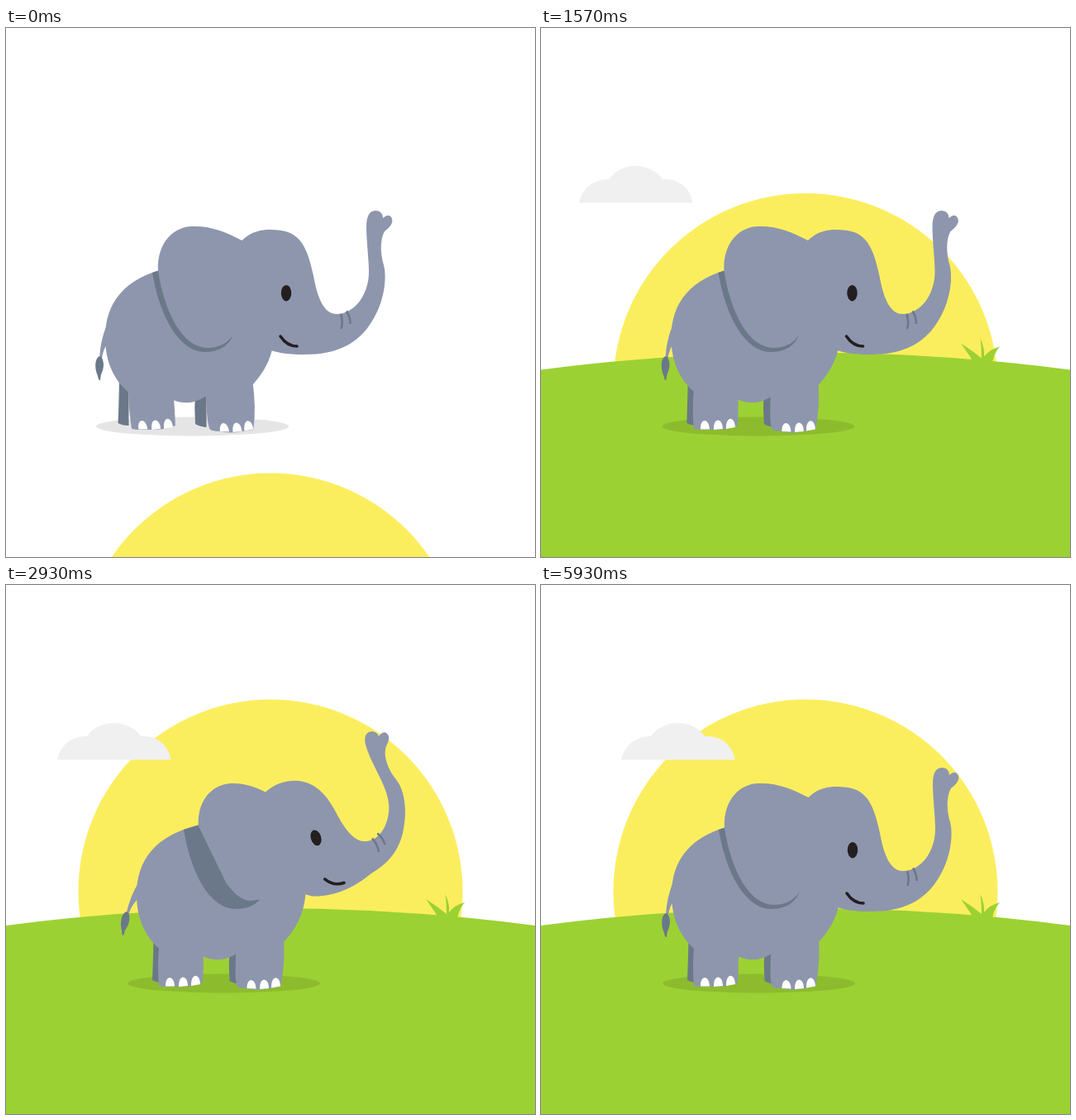
An HTML page with a canvas for the animation above (6 s loop, 640x640 px).

```html
<!DOCTYPE html>
<html lang="en">
<head>
<meta charset="utf-8">
<title>Elephant</title>
<style>
html, body { margin: 0; width: 100%; height: 100%; overflow: hidden; background: #fff; }
canvas { display: block; }
</style>
</head>
<body>
<canvas id="stage" width="640" height="640"></canvas>
<script>
const ctx = document.getElementById('stage').getContext('2d');
const LOOP = 6000, TAU = Math.PI * 2;
const SKIN = '#8e96ad', DARK = '#6b788a', INK = '#231f20', GREEN = '#9cd133';

// Each pair holds the resting pose and the trunk-up pose with matching points.
const HEAD = [
  `M222 294 C220 258 243 240 263 240 C285 239 305 247 323.5 257 C335 246 346 244 358 244
   C390 244 401 257 410 300 C414 322 421 346 438 346 C460 346 477 322 477 295
   C477 280 474 258 474 240 C474 226 479 221 485 221 C491 221 494 225 494 230
   C498 226 503 225 505 231 C507 237 500 243 496 246 C490 256 491 274 495 287
   C499 302 496 332 480 356 C464 382 438 395 400 395 C380 395 368 393 358 390
   L313 371 C307 380 297 387 282 387 C252 387 230 345 222 294 Z`,
  `M237 290 C236 255 258 240 278 240 C290 240 300 243 310 248 C322 238 335 234 346 234
   C366 234 384 252 398 271 C410 287 422 296 432 296 C449 296 458 277 458 258
   C457 228 428 202 419 172 C417 164 420 161 425 160 C430 160 433 162 434 165
   C436 160 440 157 444 160 C449 164 447 170 445 177 C443 188 451 204 463 215
   C477 229 481 252 481 273 C481 296 473 314 458 331 C436 355 410 371 375 371 C370 372 366 371 362 371
   L309 379 C303 384 296 387 284 387 C258 387 241 325 237 290 Z`
];
const EAR_SHADE = [
  'M215 296 C224 350 248 392 278 392 C296 392 307 385 313 371 L238 289 Z',
  'M215 296 C224 350 246 392 278 392 C293 392 302 387 309 379 L238 289 Z'
];
const WRINKLES = [
  'M443 346 Q446 355 443.5 364 M450 342.5 Q454.5 349 454.5 358',
  'M443 291 Q451 297 454 307 M449 284 Q457 289 460 297'
];
const MOUTH = ['M370 373 Q378 385 390 385', 'M392 349 Q404 356.5 416.5 350.5'];

const BODY = `M238 289 C180 302 158 333 158 375 C158 405 170 428 187 441 L238 449
  Q258 459 279 446 L337 431 C353 413 362 395 363 365 L300 280 Z`;
const HIND_LEG = 'M186 430 C183 455 184 475 185 485 L192 486 L215 486 Q230 485 238 481 Q239 465 239 440 Z';
const FORE_LEG = 'M279 436 C277 460 277 475 279 485 Q281 488 292 488 Q305 491 318 488 L332 486 Q338 460 336 425 Z';
const FAR_LEGS = 'M178.5 425 Q178 455 177 478 Q182 481 190 481 V425 Z M270.5 440 Q269 460 270.5 479 Q275 482 284 483 V440 Z';
const TAIL = 'M160 359 Q152 378 151 400 L154 400 Q155 390 161 381 Z';
const TUFT = 'M151 397 C156 398 157 408 155 414 Q152 420 152 426 Q150 427 149 421 C145 412 145 400 151 397 Z';
const CLOUD = 'M0 211.5 C4 193 18 183 36 183 C43 173 55 167 68.5 167 C83 167 95 174 101 183 C120 182 134 192 137.5 211.5 Z';
const GRASS = `M508 380 Q522 389 533 398 Q533 385 531.5 374 Q537 386 536 396 Q543 387 555 384
  Q547 392 545 410 H528 Q518 394 508 380 Z`;
const DROP = 'M-55 0 C-32 16 -14 18 0 15 C18 14 18 -15 0 -15 C-17 -15 -28 -2 -55 0 Z';

// Position and velocity at DROP_MID, gravity, size, mirror.
const DROP_MID = 2430;
const DROPS = [
  { x: 286, y: 132, vx: -.45, vy: .375, g: .0032, size: 1, flip: 1 },
  { x: 356, y: 51, vx: -.24, vy: -.15, g: .00147, size: .6, flip: 1 },
  { x: 516, y: 69, vx: .27, vy: .03, g: .00227, size: .62, flip: -1 }
];

const clamp = v => Math.max(0, Math.min(1, v));
const mix = (a, b, k) => a + (b - a) * k;
const span = (t, from, to) => clamp((t - from) / (to - from));
const smooth = p => p * p * (3 - 2 * p);
const rise = (t, from, length, depth) => depth * (1 - span(t, from, from + length)) ** 3;

function keyed(t, keys) {
  const i = keys.findIndex(k => k[0] > t);
  if (i < 0) return keys[keys.length - 1][1];
  const [a, b] = [keys[i - 1], keys[i]];
  return mix(a[1], b[1], span(t, a[0], b[0]));
}

function morph([a, b], k) {
  const ends = b.match(/[\d.]+/g);
  let i = 0;
  return a.replace(/[\d.]+/g, n => mix(+n, +ends[i++], k));
}

function fill(path, color) {
  ctx.fillStyle = color;
  ctx.fill(new Path2D(path));
}

function stroke(path, color, width, cap) {
  ctx.strokeStyle = color;
  ctx.lineWidth = width;
  ctx.lineCap = cap;
  ctx.stroke(new Path2D(path));
}

function oval(x, y, rx, ry, color, turn = 0) {
  ctx.fillStyle = color;
  ctx.beginPath();
  ctx.ellipse(x, y, rx, ry, turn, 0, TAU);
  ctx.fill();
}

function group(draw) {
  ctx.save();
  draw();
  ctx.restore();
}

function toe(x, bottom, tilt) {
  fill(`M${x - 5.5} ${bottom - tilt} C${x - 6} ${bottom - 15} ${x + 5} ${bottom - 15} ${x + 5.5} ${bottom - 1} Z`, '#fff');
}

function scenery(t) {
  oval(320, 371 + rise(t, 1052, 1118, 400), 232.5, 232.5, '#fbee5e');
  group(() => {
    ctx.globalAlpha = span(t, 720, 1070);
    ctx.translate(37 + .0117 * (t - 790), 0);
    fill(CLOUD, '#f0f0f0');
  });
  group(() => {
    ctx.translate(0, rise(t, 715, 1020, 350));
    oval(320, 2840, 2449, 2449, GREEN);
    fill(GRASS, GREEN);
  });
}

function drops(t) {
  const scale = span(t, 2130, 2250) * (1 - span(t, 2570, 2680));
  if (!scale) return;
  const s = t - DROP_MID;
  for (const d of DROPS) group(() => {
    ctx.translate(d.x + d.vx * s, d.y + d.vy * s + d.g * s * s / 2);
    ctx.rotate(Math.atan2(d.vy + d.g * s, d.vx));
    ctx.scale(d.size * scale, d.size * scale * d.flip);
    fill(DROP, '#2fa6eb');
  });
}

function legs(swing) {
  group(() => {
    ctx.translate(-swing * .7, 0);
    fill(FAR_LEGS, DARK);
  });
  group(() => {
    const skew = swing / 58;
    ctx.transform(1, 0, skew, 1, -skew * 425, 0);
    fill(HIND_LEG, SKIN);
    fill(FORE_LEG, SKIN);
    toe(198.5, 486.5, 1);
    toe(214.5, 486, 0);
    toe(229.5, 484, -1);
    toe(297, 489.5, 1.5);
    toe(312.5, 489, 0);
    toe(326.5, 486.5, -1);
  });
}

function elephant(t) {
  const lift = smooth(span(t, 1960, 2250)) * (1 - smooth(span(t, 2780, 3210)));
  const swing = keyed(t, [[0, 5], [790, -1.2], [1070, -.5], [1570, .4], [1650, 0]]);
  const blink = clamp(1.1 - Math.abs(t % 4000 - 790) / 110);

  ctx.translate(keyed(t, [[0, -38], [640, -20.5], [790, -16], [1070, -11], [1570, -.5], [1650, 0]]), 0);
  oval(263.5, 482, 116.5, 11.5, 'rgba(0,0,0,.1)');
  group(() => {
    ctx.translate(160, 365);
    ctx.rotate(lift * .227);
    ctx.translate(-160, -365);
    fill(TAIL, SKIN);
    fill(TUFT, DARK);
  });
  legs(swing);
  fill(BODY, SKIN);
  fill(morph(EAR_SHADE, lift), DARK);
  fill(morph(HEAD, lift), SKIN);
  stroke(morph(WRINKLES, lift), DARK, 2.6, 'butt');
  oval(mix(377, 374.2, lift), mix(320.7, 300, lift), 6.2, mix(9.7, .8, blink), INK, -.42 * lift);
  stroke(morph(MOUTH, lift), INK, 3.5, 'round');
}

function frame() {
  const t = performance.now() % LOOP;
  ctx.fillStyle = '#fff';
  ctx.fillRect(0, 0, 640, 640);
  scenery(t);
  drops(t);
  group(() => elephant(t));
  requestAnimationFrame(frame);
}
frame();
</script>
</body>
</html>
```
